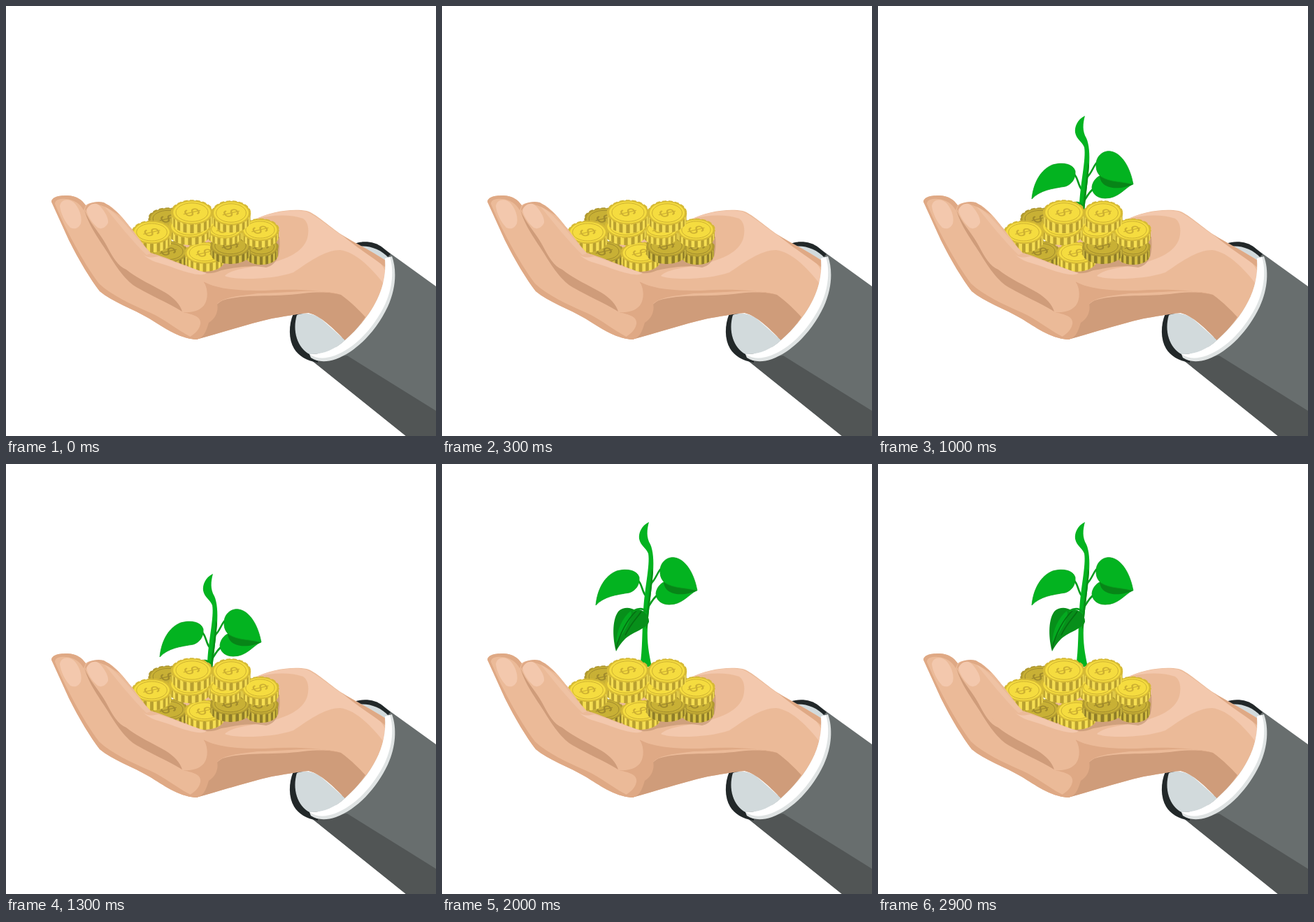
These frames come from a looping animation (615 by 615 pixels, 3.5 s). An HTML page:

```html
<!DOCTYPE html>
<html lang="en">
<head>
<meta charset="utf-8">
<title>Growing savings</title>
<style>
  html, body { margin: 0; width: 100%; height: 100%; overflow: hidden; background: #fff; }
  svg { display: block; width: 100%; height: 100%; }
  .plant { animation: grow 3.5s step-end infinite; }
  .stalk { fill: none; stroke: #069c1d; stroke-width: 2.6; stroke-linecap: round; }
  .skin { fill: #ebba98; }
  .mid { fill: #dfa985; }
  .dark { fill: #cf9c7a; }
  .light { fill: #f3c8ad; }
  .leaf { fill: #03b320; stroke: #08a01d; stroke-width: .8; }
  .sign { font: 32px "Liberation Sans", Arial, sans-serif; text-anchor: middle; }
  @keyframes grow {
    0% { transform: translateY(153px); visibility: hidden; }
    14.285% { transform: translateY(153px); visibility: visible; }
    28.571% { transform: translateY(74px); visibility: visible; }
    42.857% { transform: translateY(45px); visibility: visible; }
    57.142%, 100% { transform: none; visibility: visible; }
  }
</style>
</head>
<body>
<svg viewBox="0 0 615 615">
  <g class="plant">
    <path class="stalk" d="M280 166C286 171 286 182 291 188M312 151C307 157 306 165 297 173M309 187C302 191 298 200 293 208"/>
    <path fill="#03b320" d="M296 83C285 88 281 99 282 107C284 117 292 120 295 128C298 145 289 180 288 212C286 236 287 265 283 290H300C296 272 293 255 294 234C295 212 300 180 302 154C303 138 302 124 298 115C292 105 293 94 296 83Z"/>
    <path fill="#078f18" d="M294 234C295 212 300 180 302 154L300 150C298 178 292 208 292 236Z"/>
    <path class="leaf" d="M220 202C222 180 232 160 250 153C265 149 279 152 282 162C283 173 277 181 268 184C250 187 232 189 220 202Z"/>
    <path class="leaf" d="M306 185C307 177 312 171 319 168C331 174 350 178 364 181C352 187 344 201 325 201C313 201 306 194 306 185Z"/>
    <path fill="#078517" d="M317 168C330 173 350 178 365 181C354 186 337 189 326 183C320 180 317 174 317 168Z"/>
    <path class="leaf" d="M312 155C311 141 322 132 333 134C350 137 361 159 365 181C350 177 331 178 319 170C314 166 312 160 312 155Z"/>
    <path fill="#078f1a" d="M249 268C243 245 244 220 253 210C260 204 270 205 276 209C287 205 297 217 296 226C292 236 275 239 262 250C256 256 252 262 249 268Z"/>
    <path fill="#04aa20" d="M249 256C250 237 258 220 270 210C274 216 264 236 249 256Z"/>
    <path fill="none" stroke="#056e12" stroke-width="1.6" d="M249 264C254 243 265 222 278 210M262 245C270 228 280 219 285 211"/>
    <path class="stalk" d="M274 210C281 206 288 206 293 212"/>
  </g>

  <!-- sleeve and cuff lining -->
  <path fill="#686e6e" d="M536 344L615 401V615H572L440 509L470 490L543 380Z"/>
  <path fill="#515555" d="M436 506L488 500L615 579V615H572Z"/>
  <path fill="#222829" d="M498 340C511 335 528 337 538 345L550 355L541 364Z"/>
  <path fill="#d2dadc" d="M504 344C519 342 536 348 547 360L541 372Z"/>
  <path fill="#222829" d="M411 440C404 456 404 477 412 490C419 501 429 507 446 510L446 494L424 440Z"/>
  <path fill="#d2dadc" d="M416 442C426 438 437 439 449 446L485 478C470 492 452 499 434 498C417 489 409 465 416 442Z"/>

  <path class="skin" d="M65 280C66 272 78 271 88 271C102 272 108 277 114 285C122 279 138 280 147 285C163 296 172 310 180 319L208 352L355 306C376 294 410 289 430 293C442 296 462 315 480 327C495 337 522 350 545 365C546 405 523 444 485 478C467 460 450 443 433 439C415 440 395 445 380 447C345 455 305 468 272 477C245 475 225 459 205 447C181 433 152 423 134 408C121 391 105 365 90 335Z"/>
  <path class="light" d="M359 304C380 294 410 290 430 294C444 300 462 316 480 328L506 343C520 350 536 365 543 380L541 398C525 378 502 352 478 349C455 349 431 368 411 381C380 392 325 392 313 386C322 376 350 374 373 369C402 362 425 352 431 332C434 319 432 309 425 304C405 297 379 299 359 304Z"/>
  <path class="mid" d="M480 327C495 337 522 350 544 365L543 374C526 360 503 347 480 327Z"/>
  <path class="dark" d="M272 477C287 463 290 430 310 421C343 411 380 417 425 411C452 408 468 410 479 413C494 424 505 435 514 445C506 457 496 468 485 478C467 460 450 443 433 439C415 440 395 445 380 447C345 455 305 468 272 477Z"/>
  <path class="mid" d="M282 394C289 402 289 417 285 425C280 435 268 439 253 438C267 441 280 444 278 455C276 465 267 471 260 475L272 477C284 475 287 462 290 453C301 446 304 435 302 426C312 416 332 415 360 411C410 410 445 403 479 413C450 406 409 404 370 407C335 407 304 406 282 394Z"/>

  <path fill="#b98a67" opacity=".55" d="M257 370C270 382 291 386 308 378C330 374 350 370 372 374C389 370 393 354 391 330L330 330Z"/>
  <g id="coins"></g>

  <!-- fingers in front of the coins -->
  <path class="skin" d="M147 285C163 296 172 310 180 319C190 332 199 345 207 353C226 358 254 371 286 382L282 400H200L130 330Z"/>
  <path class="light" d="M196 355C202 361 209 360 218 358C240 365 260 374 287 382C280 388 257 381 236 373C220 367 206 366 196 355Z"/>
  <path class="light" d="M140 286C157 294 177 320 207 354L201 356C181 337 160 310 140 286Z" opacity=".55"/>
  <path class="mid" d="M65 280C66 272 78 271 88 271C102 272 108 277 114 285L111 292C106 283 98 277 86 276C77 275 70 277 70 283C84 317 108 363 133 397C151 414 180 427 207 439C229 449 246 465 272 477C245 475 225 459 205 447C181 433 152 423 134 408C121 391 105 365 90 335Z"/>
  <path class="dark" d="M112 291C119 310 134 324 143 341C153 360 160 372 172 377C188 390 211 400 228 410C241 418 249 427 252 437C231 424 207 414 190 404C175 397 161 378 151 362C139 341 119 318 112 291Z"/>
  <path class="mid" d="M113 291C114 282 129 278 140 281C149 286 157 293 163 300C151 292 139 284 129 284C120 285 117 289 118 297Z"/>
  <path class="light" d="M77 286C79 275 92 275 99 283C106 292 109 303 107 311C104 318 98 320 92 317C84 309 78 296 77 286Z"/>
  <path class="light" d="M115 292C118 284 126 281 132 284C140 291 147 303 146 310C143 317 136 320 131 317C123 310 117 301 115 292Z"/>

  <!-- cuff: grey edge with a white band inside it -->
  <path fill="#dfe3e3" d="M542 361L552 358C559 377 558 404 546 430C530 464 502 494 472 505C457 510 445 509 436 503L434 498C452 499 470 492 485 478C523 444 546 405 542 361Z"/>
  <path fill="#fff" d="M542 361L549 359C555 377 553 403 542 427C526 460 500 489 470 500C456 505 445 505 434 498C452 499 470 492 485 478C523 444 546 405 542 361Z"/>
</svg>
<script>
  const bright = { top: '#f5dc3f', rim: '#d6ba35', line: '#cdb032', side: '#f5de52', bar: '#b9a030' };
  const shade = { top: '#c8b035', rim: '#b09930', line: '#a08a2c', side: '#d6c043', bar: '#8f7d29' };

  function coin(cx, cy, rx, ry, h, c = bright) {
    const bars = [];
    const count = 9;
    // Milled edge: equal angles crowd together toward the sides.
    for (let i = 0; i < count; i++) {
      const at = k => {
        const a = Math.PI * (i + k) / count;
        return [cx - rx * Math.cos(a), cy + ry * Math.sin(a)].map(n => n.toFixed(1));
      };
      const [x1, y1] = at(.25), [x2, y2] = at(.75);
      bars.push(`M${x1} ${y1}v${h}L${x2} ${+y2 + h}v${-h}Z`);
    }
    const oval = (k, extra) =>
      `<ellipse cx="${cx}" cy="${cy}" rx="${rx * k}" ry="${ry * k}" ${extra}/>`;
    return `<path fill="${c.side}" d="M${cx - rx} ${cy}v${h}a${rx} ${ry} 0 0 0 ${2 * rx} 0v${-h}Z"/>
      <path fill="${c.bar}" d="${bars.join('')}"/>
      ${oval(1, `fill="${c.rim}" stroke="${c.rim}" stroke-width="1.6" stroke-dasharray="6 3"`)}
      ${oval(.91, `fill="${c.top}"`)}
      ${oval(.78, `fill="none" stroke="${c.line}" stroke-width="1"`)}
      <text class="sign" fill="${c.line}" transform="translate(${cx} ${cy}) scale(1 .58) rotate(68)" y="11">$</text>`;
  }

  document.getElementById('coins').innerHTML = [
    coin(232, 304, 28, 15, 13, shade),
    coin(232, 351, 27, 15, 13, shade),
    coin(284, 353, 28, 15, 12),
    coin(365, 344, 24, 14, 12, shade),
    coin(321, 343, 28.5, 15, 11, shade),
    coin(313, 319, 25, 13, 10),
    coin(363.5, 320, 26.5, 15.5, 10),
    coin(263, 315, 29.5, 16, 11),
    coin(208.5, 323.5, 28, 16, 13),
    coin(322, 296, 27.5, 17, 11),
    coin(266, 295, 29.5, 17, 13)
  ].join('');
</script>
</body>
</html>
```
